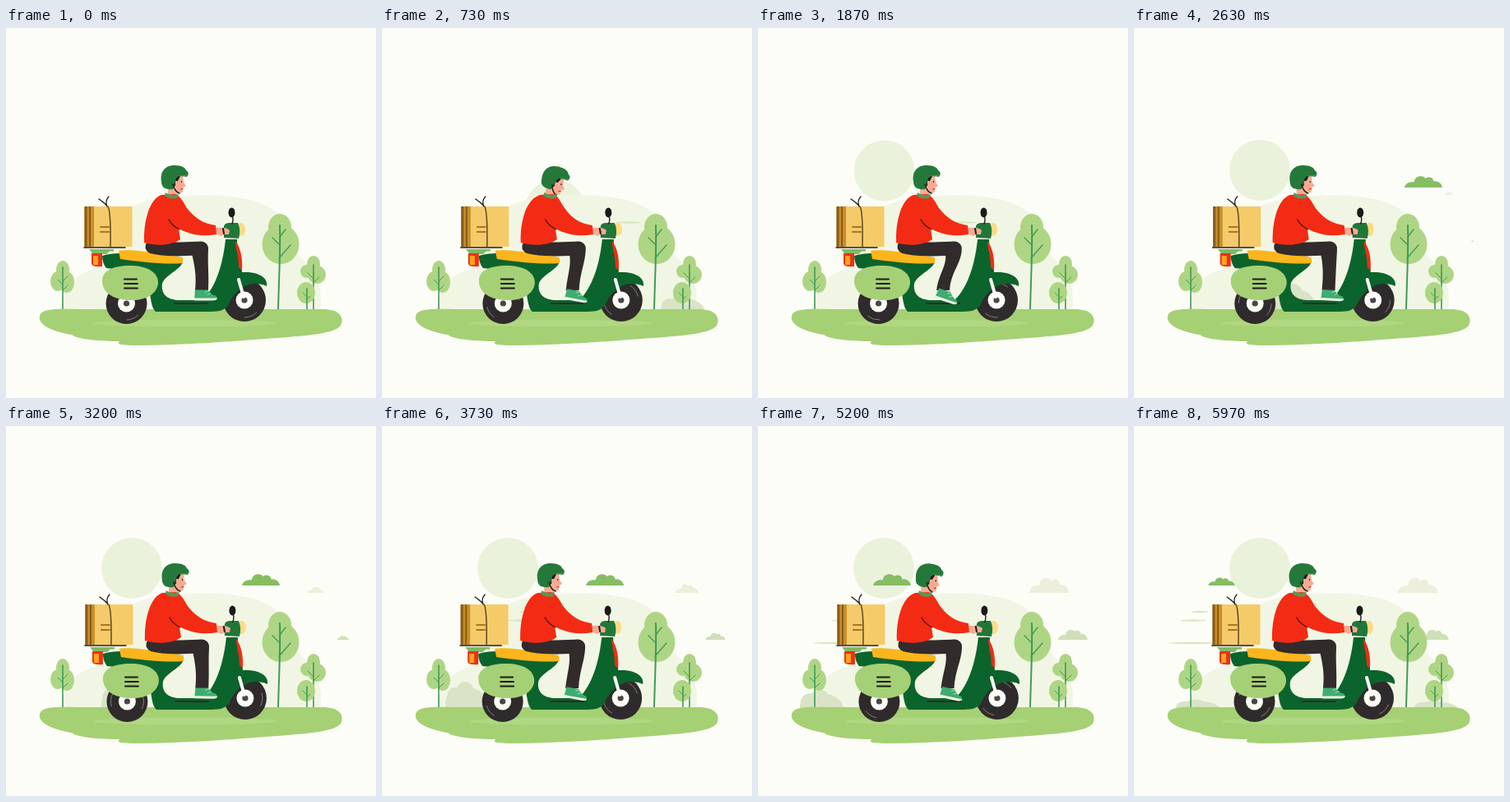
These frames come from a looping animation (450x450 px, 6.01 s). An HTML page with a canvas:

```html
<!DOCTYPE html>
<html lang="en">
<head>
<meta charset="utf-8">
<title>Scooter delivery</title>
<style>
html, body { margin: 0; width: 100%; height: 100%; overflow: hidden; background: #fdfdf8; }
canvas { display: block; width: 100vw; height: 100vh; }
</style>
</head>
<body>
<canvas id="stage"></canvas>
<script>
const LOOP = 6010, SIZE = 450, TAU = Math.PI * 2;
const canvas = document.getElementById('stage');
const ctx = canvas.getContext('2d');
const C = {
  sky: '#fdfdf8', blob: '#f1f6e4', sun: '#ebf2dc', grass: '#a6d074', glow: '#b0d781',
  leaf: '#aed584', trunk: '#3f9b56', dark: '#0b642b', panel: '#a6d076', tyre: '#2f2a2b',
  pants: '#312b2c', red: '#f32b14', seat: '#fcb51c', skin: '#f5ab93', ink: '#1b1a1a',
  helmet: '#24793a', rock: '#d9e3c6', hub: '#fcfcf7'
};

function path(color, d) {
  ctx.fillStyle = color;
  ctx.fill(new Path2D(d));
}
function line(color, width, d) {
  ctx.strokeStyle = color;
  ctx.lineWidth = width;
  ctx.stroke(new Path2D(d));
}
function oval(color, x, y, rx, ry = rx) {
  ctx.fillStyle = color;
  ctx.beginPath();
  ctx.ellipse(x, y, rx, ry, 0, 0, TAU);
  ctx.fill();
}
function at(x, y, draw, sx = 1, sy = sx, turn = 0) {
  ctx.save();
  ctx.translate(x, y);
  ctx.rotate(turn);
  ctx.scale(sx, sy);
  draw();
  ctx.restore();
}
const ramp = (t, from, to) => Math.min(1, Math.max(0, (t - from) / (to - from)));
const mix = (a, b, u) => a + (b - a) * u;
const easeOut = u => Math.sin(u * Math.PI / 2);
const easeInOut = u => (1 - Math.cos(u * Math.PI)) / 2;
const bump = u => Math.sin(u * Math.PI) ** 2;
const cycle = (t, times) => Math.cos(TAU * times * t / LOOP);

function sun(t) {
  const u = easeOut(ramp(t, 0, 2000));
  oval(C.sun, mix(279, 153, u), mix(279, 173, u), 37);
}

function blob() {
  path(C.blob, 'M66 344C71 314 86 295 118 291C112 250 136 216 178 209C225 200 292 200 322 219C351 237 344 262 358 279C378 296 386 318 382 344Z');
}

function cloud(color, x, y, w, h) {
  if (w <= 0) return;
  at(x, y, () => path(color,
    'M-50 0C-48 -24 -36 -34 -24 -30C-24 -62 -2 -72 6 -50C14 -64 27 -54 27 -34C39 -40 49 -20 50 0Z'),
    w / 100, h / 60);
}

function clouds(t) {
  const near = 46 * ramp(t, 1930, 2500) * (1 - 0.32 * ramp(t, 5400, LOOP));
  const middle = 49 * ramp(t, 2000, 5000);
  const far = 36 * ramp(t, 2400, 4400);
  cloud('#86bd62', 352 - (t - 2630) * 0.0735, 194, near, near * 0.29);
  cloud('#eeeedc', 383 - (t - 2630) * 0.0113, 203, middle, middle * 0.36);
  cloud('#cfdfb8', 412 - 48 * ramp(t, 2400, 6000) ** 2, 260, far, far * 0.33);
}

function rock(x, height) {
  if (height <= 0) return;
  at(x, 343, () => path(C.rock,
    'M-27 0C-27 -18 -22 -27 -13 -25C-8 -36 4 -33 7 -24C17 -22 25 -11 26 0Z'), 1, height);
}

function rocks(t) {
  const x = mix(385, 78, easeInOut(ramp(t, 0, 4600)));
  rock(x, ramp(t, 0, 1300) - 0.7 * ramp(t, 4600, LOOP));
  rock(368, 0.3 * ramp(t, 5300, LOOP));
}

function trees() {
  oval(C.leaf, 69, 294, 8, 11);
  oval(C.leaf, 63, 308, 9, 12);
  oval(C.leaf, 74, 309, 9, 13);
  line(C.trunk, 1.6, 'M69 343V291');
  line(C.trunk, 1, 'M69 312L63 306M69 308L75 302M69 319L75 313');
  oval(C.leaf, 374, 287, 8, 10);
  oval(C.leaf, 366, 296, 8, 8);
  oval(C.leaf, 378, 300, 11, 11);
  line(C.trunk, 1.6, 'M374 343V288');
  line(C.trunk, 1, 'M374 305L367 298M374 310L381 303');
  oval(C.leaf, 365, 322, 11, 13);
  line(C.trunk, 1.6, 'M366 343V317');
  line(C.trunk, 0.9, 'M366 327L361 322M366 330L370 326');
  oval(C.leaf, 333, 242, 14, 16);
  oval(C.leaf, 334, 263, 22.5, 24);
  line(C.trunk, 2, 'M331 343C332 300 334 270 333 240');
  line(C.trunk, 1.3, 'M333 264L324 255M333 254L340 245M332 280L346 264');
}

function ground() {
  path(C.grass, 'M41 350C44 339 68 342 110 342H385C405 342 411 351 408 360C404 372 365 374 330 377C285 380 235 385 165 386C145 386 133 386 138 381C117 381 86 379 80 373C60 370 38 362 41 350Z');
  oval(C.glow, 218, 359, 112, 4.5);
}

function streaks(t) {
  const streak = (x, y, length) => oval('#d6e7bd', x, y, length / 2, 1.2);
  const left = 5970 - t;
  streak(72 + left * 0.0435, 236.5, 32 * ramp(t, 450, 700));
  streak(71 + left * 0.032, 264, 58 * ramp(t, 3600, 4400));
  streak(80 + left * 0.04, 226, 21 * ramp(t, 3600, 4400));
}

function wheel(x, y, r, spin) {
  oval(C.tyre, x, y, r);
  ctx.strokeStyle = '#85807a';
  ctx.lineWidth = 1;
  for (const a of [spin, spin + Math.PI]) {
    ctx.beginPath();
    ctx.arc(x, y, r - 5, a, a + 0.75);
    ctx.stroke();
  }
  oval(C.hub, x, y, 10.5);
  oval('#4b4646', x, y, 3.6);
}

function parcel() {
  path('#f5ca68', 'M106 217H153.5V266H106Z');
  path('#c78f2a', 'M95.5 217H107V266H95.5Z');
  path('#8a5a18', 'M95.5 217H98.5V266H95.5ZM101 217H103V266H101Z');
  line('#55401f', 1.4, 'M124 217C128 225 127 250 127 266');
  line(C.ink, 1.3, 'M123 217C121 213 117 211 113 208M123 217C121 212 122 208 125 205');
  line('#a87525', 2, 'M115 242H125M115 248H125');
}

function scooter(spin) {
  wheel(146.5, 335, 25, spin);
  wheel(290, 331, 26, spin);
  // rack and tail light
  path('#80bb62', 'M101 269H131V271.5H126L122 275H106Z');
  line(C.ink, 1.6, 'M95 267H145');
  path('#ee3016', 'M104 274H117V290Q106 291 104 287Z');
  path('#ffa51c', 'M106 277H112V288H106Z');
  parcel();
  // frame
  path(C.dark, 'M117 277C140 270 190 276 215 282C216 293 194 299 190 311C188 325 198 331 211 331H239C251 320 263 296 267 257H281C281 278 288 289 287 297C308 296 319 304 317 314C296 305 279 318 271 336C266 345 256 345 244 345H182C174 337 177 318 170 297L122 292Q117 286 117 277Z');
  line(C.tyre, 2, 'M205 335H245');
  path('#ed2d13', 'M279 259C286 268 288 282 287 295L283 291C283 277 279 269 279 259Z');
  line(C.hub, 4, 'M283 306L289 327');
  path(C.panel, 'M117 307C117 295 131 289 150 289C172 289 185 297 185 310C184 323 171 331 153 331C132 331 117 323 117 307Z');
  line(C.ink, 1.9, 'M144 305.5H159M144 311H160M144 316.5H160');
  path(C.seat, 'M137 271C153 268 196 276 215 279V286C192 288 161 284 139 281Z');
  // steering head
  oval('#fbdb84', 286, 245, 5, 8);
  path('#20773a', 'M265 241Q266 237 272 237H282Q286 246 283 256L265 255Z');
  line(C.ink, 1.4, 'M275 238C277 233 276 229 274 225');
  oval(C.ink, 274.5, 224.5, 4, 6);
  line(C.ink, 4, 'M260 248H267');
}

function head(nod) {
  at(203, 203, () => {
    ctx.translate(-203, -203);
    path(C.skin, 'M197 190H211L209 205H197Z');
    path(C.skin, 'M202 179H215L216 188L219 192L215.5 194L215 199Q211 203 203 197Z');
    path(C.ink, 'M202 180H212L209 186H206V192L202 193Z');
    path(C.helmet, 'M189 187C187 174 194 167 205 167C214 167 218 170 219 173Q224 176 220 181Q215 180 211 180C205 181 206 190 203 196C194 197 189 194 189 187Z');
    line('#4b9755', 1, 'M211 180Q217 180 221 179');
    line(C.ink, 1.4, 'M203 190Q205 199 211 201');
    line('#b32a1a', 1, 'M212.5 196L215 195.5');
    oval(C.ink, 213.5, 187, 0.7, 1.1);
  }, 1, 1, nod);
}

function leg(swing) {
  const foot = 235.5 + 7.5 * swing, knee = 238 - swing, ankle = foot - 5;
  line(C.pants, 17, `M178 266C196 270 214 269 ${knee} 268`);
  path(C.pants, `M${knee - 10} 262Q${knee + 10} 256 ${knee + 9} 270C${knee + 8} 287 ${ankle + 9} 298 ${ankle + 8} 319H${ankle - 8}C${ankle - 6} 300 ${knee - 8} 288 ${knee - 11} 274Z`);
  at(foot, 325.5 + (1 - swing), () => {
    path('#3fac70', 'M-13 -7H2Q6 -1 12 0Q15 3 13 5H-14Z');
    path('#eef4e6', 'M-14 3H14Q13 6 9 6H-14Z');
    line('#9bd8b2', 1, 'M-1 -4L3 -6M2 -1L6 -3');
  }, 1, 1, 0.19 * (1 - swing));
}

function rider(t) {
  const nod = 0.26 * (bump(ramp(t, 0, 1700)) + bump(ramp(t, 3900, 5600)));
  const s = nod * 10;
  leg(cycle(t, 2));
  head(nod);
  path(C.skin, 'M252 244C259 242 268 242 272 246L271 251H265L262 253L253 250Z');
  path(C.red, `M${189 + s} 203C174 208 167 236 168 261C184 266 203 264 212 257L210 244C225 252 240 254 256 251L255 240C241 238 230 232 ${220 + s / 2} 219C214 208 ${210 + s} 203 ${205 + s} 202Z`);
  path('#4d9d5a', `M${194 + s} 200Q${200 + s} 205 ${210 + s} 202L${208 + s} 207Q${199 + s} 209 ${193 + s} 204Z`);
  line('#4a1914', 1.3, 'M198 233C201 239 205 242 211 245');
  line(C.ink, 2, 'M264 244L265 250');
}

function draw(t) {
  const w = Math.round(innerWidth * devicePixelRatio), h = Math.round(innerHeight * devicePixelRatio);
  if (canvas.width !== w || canvas.height !== h) {
    canvas.width = w;
    canvas.height = h;
  }
  ctx.setTransform(w / SIZE, 0, 0, h / SIZE, 0, 0);
  ctx.lineCap = ctx.lineJoin = 'round';
  ctx.fillStyle = C.sky;
  ctx.fillRect(0, 0, SIZE, SIZE);
  sun(t);
  blob();
  clouds(t);
  rocks(t);
  trees();
  ground();
  streaks(t);
  const shake = (1 - cycle(t, 3)) / 2;
  at(shake, 0, () => {
    scooter(TAU * 10 * t / LOOP + 0.8);
    rider(t);
  });
}

const start = performance.now();
function tick() {
  draw((performance.now() - start) % LOOP);
  requestAnimationFrame(tick);
}
tick();
</script>
</body>
</html>
```
